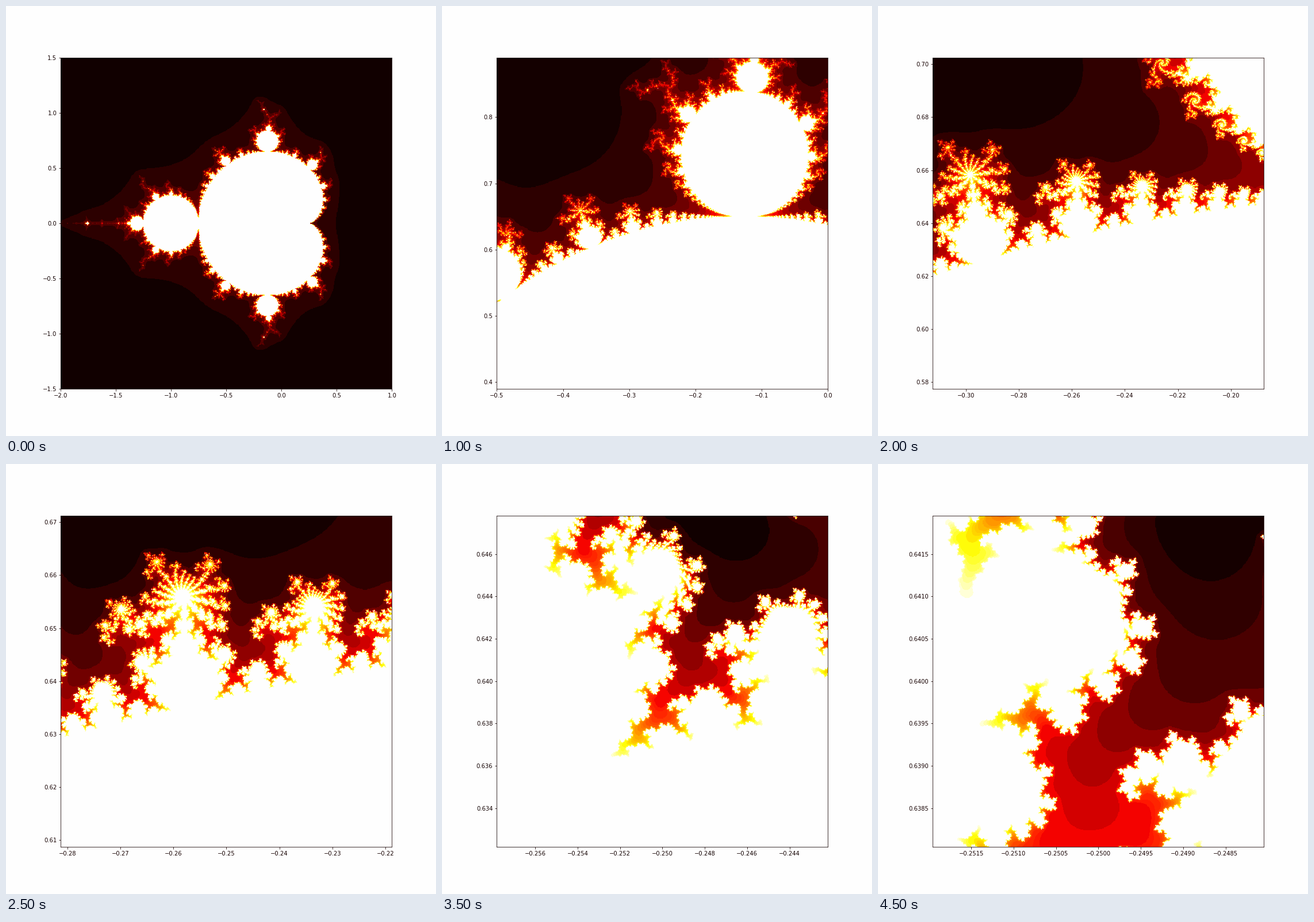
A matplotlib script for the animation above (5 s loop, 748 by 748 pixels).

```python
from functools import lru_cache

import numpy as np
import matplotlib.pyplot as plt
from matplotlib.animation import FuncAnimation
from matplotlib.colors import ListedColormap

SIZE, DPI = 748, 72
FRAMES, INTERVAL = 10, 500
GRID, BLOCK = 500, 50
MAX_ITER, RADIUS = 100, 10
CENTER = (-0.25, 0.64)
PAPER = (254 / 255,) * 3
INK_PIXELS = 3000


def view(i):
    """Full set first, then a zoom that halves the window each step."""
    if i == 0:
        return (-2.0, 1.0, -1.5, 1.5)
    half = 0.5 ** i
    x, y = CENTER
    return (x - half, x + half, y - half, y + half)


def escape_block(c):
    """Steps that keep |z| within RADIUS, for a flat array of points."""
    counts = np.full(c.size, MAX_ITER, dtype=np.float32)
    x, y2 = c.real, c.imag ** 2
    q = (x - 0.25) ** 2 + y2
    idx = np.flatnonzero(q * (q + x - 0.25) > 0.25 * y2)  # skip the cardioid
    c = c[idx]
    z = np.zeros_like(c)
    for n in range(MAX_ITER):
        z *= z
        z += c
        out = z.real ** 2 + z.imag ** 2 > RADIUS ** 2
        if out.any():
            counts[idx[out]] = n
            keep = ~out
            idx, z, c = idx[keep], z[keep], c[keep]
        if not idx.size:
            break
    return counts


def banded_hot(data):
    """The hot colormap, posterised to the mean colour of each colour cell."""
    rgb = plt.get_cmap("hot")(np.arange(256), bytes=True)[:, :3].astype(int)
    unit = (data - data.min()) / (data.max() - data.min())
    level = np.minimum((unit * 256).astype(int), 255)
    weight = np.bincount(level.ravel(), minlength=256) + 0.01
    weight *= (0.77 * SIZE / GRID) ** 2
    cell = (rgb[:, 0] // 32) * 128 + (rgb[:, 1] // 16) * 8 + rgb[:, 2] // 32
    bands = np.zeros((256, 3))
    for key in np.unique(cell):
        m = cell == key
        total = weight[m].sum() + (INK_PIXELS if key == 0 else 0)
        bands[m] = np.floor(weight[m] @ rgb[m] / total + 1e-6) / 255
    bands[cell == cell[-1]] = PAPER
    return ListedColormap(bands)


@lru_cache(maxsize=None)
def scene(i):
    x0, x1, y0, y1 = view(i)
    xs, ys = np.linspace(x0, x1, GRID), np.linspace(y0, y1, GRID)
    rows = []
    for k in range(0, GRID, BLOCK):
        c = xs[None, :] + 1j * ys[k:k + BLOCK, None]
        rows.append(escape_block(c.ravel()).reshape(c.shape))
    data = np.vstack(rows)
    return data, banded_hot(data)


fig, ax = plt.subplots(figsize=(SIZE / DPI, SIZE / DPI), dpi=DPI)
fig.set_facecolor(PAPER)


def draw(i):
    data, cmap = scene(i)
    ink = cmap(0)
    ax.clear()
    ax.set_facecolor(PAPER)
    image = ax.imshow(data, cmap=cmap, extent=view(i), origin="lower")
    ax.tick_params(color=ink, labelcolor=ink)
    for spine in ax.spines.values():
        spine.set_color(ink)
    return [image]


anim = FuncAnimation(fig, draw, frames=FRAMES, interval=INTERVAL,
                     init_func=lambda: draw(0), repeat=True, repeat_delay=0)
plt.show()
```
